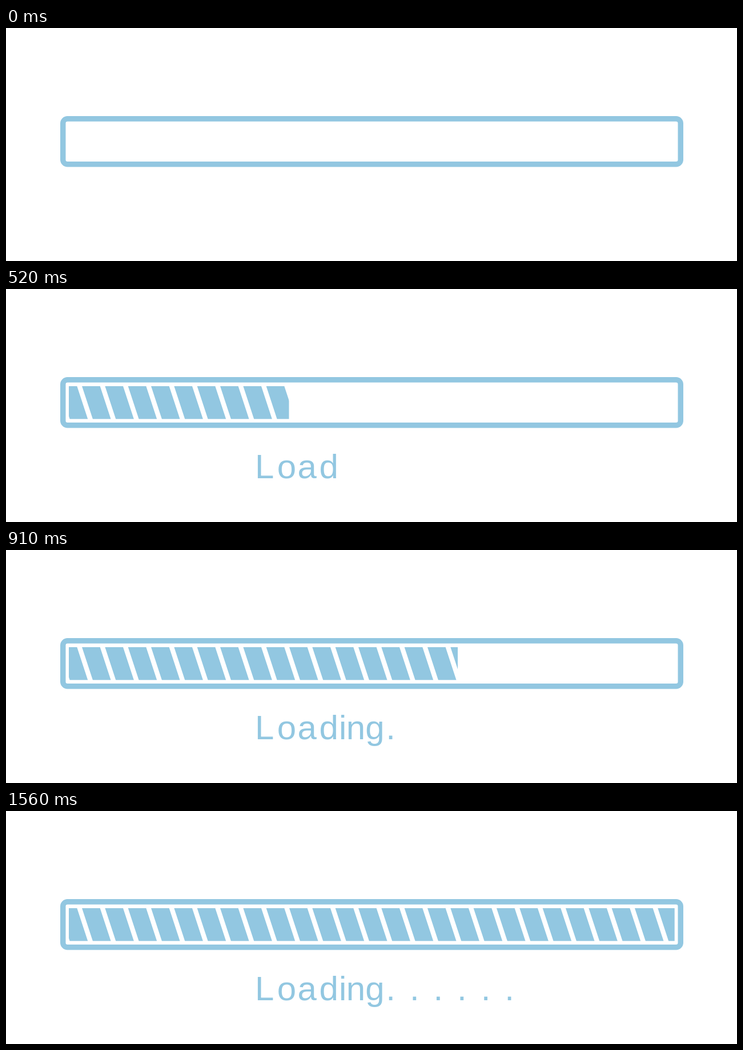
Write an HTML page that moves like this. It is 1280 by 410 pixels and loops after 2080 ms.

```html
<!DOCTYPE html>
<html lang="en">
<head>
<meta charset="utf-8">
<title>Loading</title>
<style>
  html, body { margin: 0; width: 100%; height: 100%; overflow: hidden; background: #fff; }
  svg { display: block; width: 1280px; height: 410px; }
  text { font: 60px "Liberation Sans", Arial, sans-serif; }
</style>
</head>
<body>
<svg viewBox="0 0 1280 410" fill="#92c7e1">
  <rect id="fill" x="110" y="171" width="0" height="57.7"/>
  <path id="gaps" fill="#fff"/>
  <rect x="99.75" y="159.75" width="1081.5" height="80" rx="8" fill="none" stroke="#92c7e1" stroke-width="9.5"/>
  <text id="label" y="332.5"></text>
</svg>
<script>
  const STEP = 130, LOOP = 2080, LAST_STEP = 12;
  const LEFT = 110, RIGHT = 1170.7;
  const TEXT = 'Loading......';
  const [fill, gaps, label] = ['fill', 'gaps', 'label'].map(id => document.getElementById(id));

  // Slanted white gaps, evenly spaced; the first one trims the lower left corner.
  gaps.setAttribute('d', Array.from({ length: 27 }, (_, i) =>
    `M${(83.7 + i * 40.33).toFixed(2)} 170h8.7l19.6 60h-8.7z`).join(''));

  const letterX = [436, 474.7, 510.6, 548.6, 583, 595.8, 629.3];
  const dotX = Array.from({ length: 6 }, (_, i) => 665.3 + i * 41.6);
  label.setAttribute('x', [...letterX, ...dotX].join(' '));

  let shown = -1;
  function draw(time) {
    const step = Math.min(LAST_STEP, Math.floor(time % LOOP / STEP));
    if (step === shown) return;
    shown = step;
    const edge = step ? Math.min(RIGHT, 101.5 + step * 98.5) : LEFT;
    fill.setAttribute('width', edge - LEFT);
    // The last two letters arrive together.
    label.textContent = TEXT.slice(0, step + (step > 5));
  }

  const start = performance.now();
  function tick() {
    draw(performance.now() - start);
    requestAnimationFrame(tick);
  }
  tick();
</script>
</body>
</html>
```
